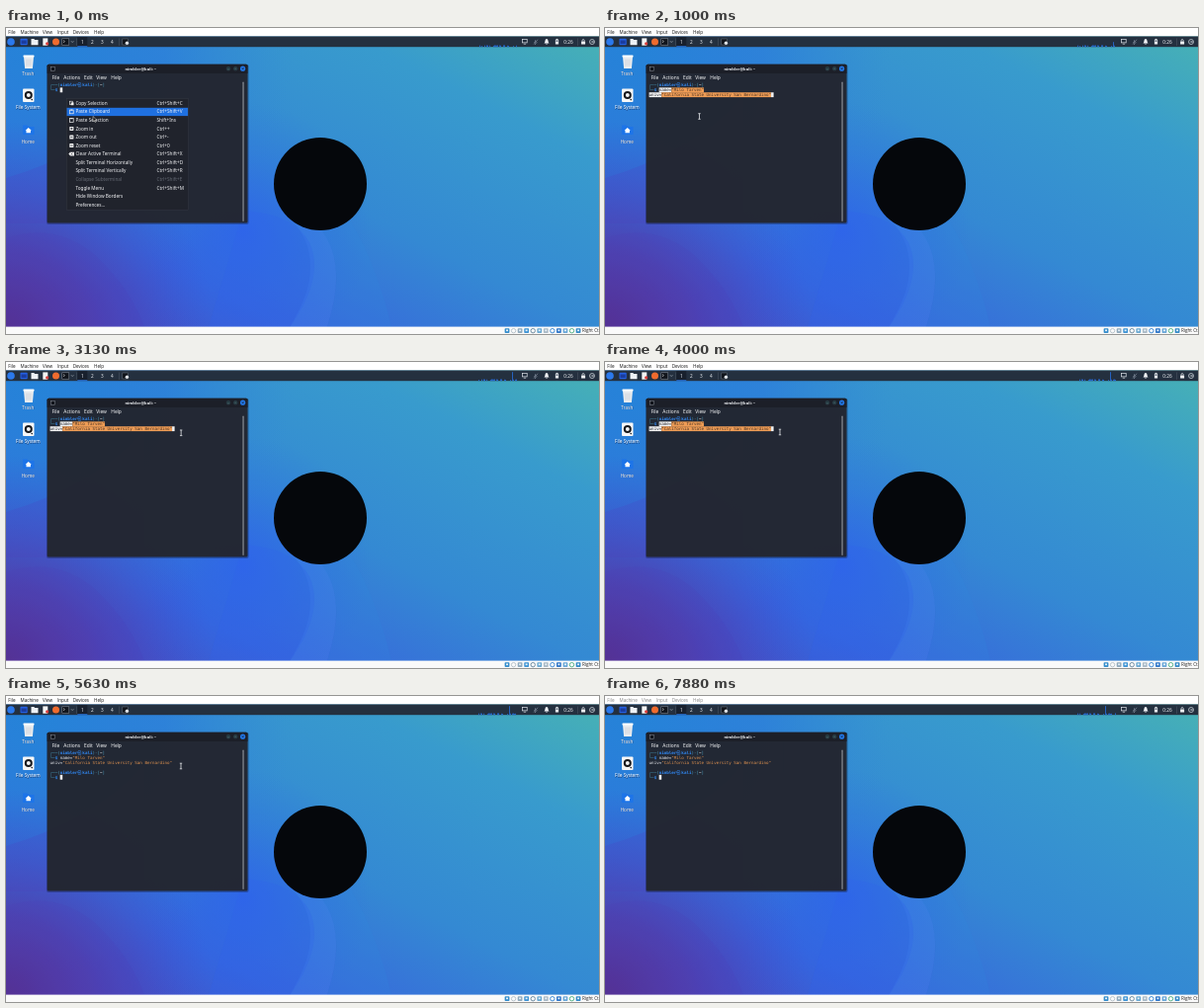
Recreate the animation shown at these times as an HTML page. Size 600x310 px, loop 8000 ms.

```html
<!DOCTYPE html>
<html lang="en">
<head>
<meta charset="utf-8">
<title>Terminal paste</title>
<style>
html, body { margin: 0; width: 100%; height: 100%; overflow: hidden; background: #3a8fd0; }
svg { display: block; width: 600px; height: 310px; }
text { font-family: "Noto Sans", "Open Sans", sans-serif; font-size: 4.7px; font-weight: 500; }
.mono { font-family: "DejaVu Sans Mono", "Noto Sans Mono", monospace; font-size: 4.2px; font-weight: 400; }
.host { font-family: "Open Sans", sans-serif; font-size: 4.6px; }
</style>
</head>
<body>
<svg id="stage" viewBox="0 0 600 310" xmlns="http://www.w3.org/2000/svg">
  <defs>
    <linearGradient id="sky" x1="0" y1="1" x2="1" y2="0">
      <stop offset="0" stop-color="#4a45b8"/>
      <stop offset=".25" stop-color="#3865dc"/>
      <stop offset=".5" stop-color="#3489d3"/>
      <stop offset=".78" stop-color="#389bcd"/>
      <stop offset="1" stop-color="#48b3b3"/>
    </linearGradient>
    <radialGradient id="purple" gradientUnits="userSpaceOnUse" cx="0" cy="305" r="210">
      <stop offset="0" stop-color="#55308f"/>
      <stop offset=".4" stop-color="#523aa8" stop-opacity=".75"/>
      <stop offset="1" stop-color="#4048cc" stop-opacity="0"/>
    </radialGradient>
    <radialGradient id="azure" gradientUnits="userSpaceOnUse" cx="240" cy="205" r="130">
      <stop offset="0" stop-color="#2c62ee" stop-opacity=".75"/>
      <stop offset="1" stop-color="#2c6ae0" stop-opacity="0"/>
    </radialGradient>
    <radialGradient id="corner" gradientUnits="userSpaceOnUse" cx="30" cy="20" r="260">
      <stop offset="0" stop-color="#2583d8"/>
      <stop offset=".5" stop-color="#2a7cdc" stop-opacity=".7"/>
      <stop offset="1" stop-color="#2f85d8" stop-opacity="0"/>
    </radialGradient>
  </defs>
  <rect width="600" height="310" fill="url(#sky)"/>
  <rect width="600" height="310" fill="url(#corner)"/>
  <rect width="600" height="310" fill="url(#azure)"/>
  <path d="M0 152Q90 125 140 70V198H0Z" fill="#4354cc" opacity=".35"/>
  <rect width="600" height="310" fill="url(#purple)"/>
  <path d="M0 213Q50 196 90 230Q125 262 140 303H0Z" fill="#4c38ae" opacity=".13"/>
  <path d="M300 190C330 206 345 240 325 303H287C308 270 322 226 285 190Z" fill="#4a8cf0" opacity=".22"/>
  <path d="M345 190Q374 235 390 303H325C343 246 335 212 300 190Z" fill="#2f86dc" opacity=".2"/>
  <path d="M240 185C290 188 312 210 312 240C312 265 297 290 287 303H205Z" fill="#2f5fea" opacity=".24"/>
  <circle cx="318" cy="158" r="47" fill="#05070b"/>
  <g id="desktop"></g>
  <g id="terminal"></g>
  <g id="blank"></g>
  <g id="pasted"></g>
  <g id="entered"></g>
  <g id="popup"></g>
  <g id="bars"></g>
  <g id="graph"></g>
  <path id="arrow" d="M0 0V5.2L1.3 4.1 2.2 6 3.1 5.6 2.3 3.8H3.9Z" fill="#111" stroke="#eee" stroke-width=".5"/>
  <path id="beam" d="M-1.2-2.8H1.2M0-2.8V2.8M-1.2 2.8H1.2" fill="none" stroke="#e4e6ea" stroke-width=".8"/>
</svg>
<script>
const $ = id => document.getElementById(id);
const text = (x, y, s, fill = "#fff", extra = "") =>
  `<text x="${x}" y="${y}" fill="${fill}" ${extra}>${s}</text>`;
const rect = (x, y, w, h, fill, extra = "") =>
  `<rect x="${x}" y="${y}" width="${w}" height="${h}" fill="${fill}" ${extra}/>`;
const circle = (x, y, r, fill, extra = "") =>
  `<circle cx="${x}" cy="${y}" r="${r}" fill="${fill}" ${extra}/>`;
const line = (d, stroke, w = .7) =>
  `<path d="${d}" fill="none" stroke="${stroke}" stroke-width="${w}"/>`;
const centered = 'text-anchor="middle"';

// Desktop icons
$("desktop").innerHTML =
  `<path d="M18 29H28L26.9 41H19.1Z" fill="#e9ecef"/>` + rect(17.5, 27.5, 11, 2, "#fff", 'rx=".6"') +
  line("M21 31.5V38.5M23 31.5V38.5M25 31.5V38.5", "#c3c8ce", .6) +
  rect(17, 61.5, 11.5, 13.5, "#f7f7f7", 'rx="1"') + circle(22.8, 68, 3, "none", 'stroke="#17191d" stroke-width="2"') + circle(26.2, 72.6, .8, "#17191d") +
  `<path d="M17 98.5H21.3L22.6 100H28.5V108H17Z" fill="#1d74e8"/><path d="M19.6 103.7 22.7 101 25.8 103.7H24.9V106.3H20.5V103.7Z" fill="#fff"/>` +
  [["Trash", 47.7], ["File System", 82.2], ["Home", 116.6]]
    .map(([s, y]) => text(22.6, y + .4, s, "#173a70", centered) + text(22.3, y, s, "#fff", centered)).join("");

// Terminal window
const user = "nimbler", person = "Milo Tarven";
$("terminal").innerHTML =
  rect(41, 37, 204.6, 162, "#0c1630", 'rx="2" opacity=".3"') +
  rect(41.7, 36.8, 202.8, 160.7, "#232630", 'rx="1.5" opacity=".955"') +
  `<path d="M41.7 46V38.3Q41.7 36.8 43.2 36.8H243Q244.5 36.8 244.5 38.3V46Z" fill="#1c1f28"/>` +
  rect(45.5, 39.3, 4.2, 4, "#11141b", 'stroke="#8d929b" stroke-width=".5"') +
  text(136.3, 42.9, user + "@kali: ~", "#eef0f3", centered + ' style="font-size:4.1px;font-weight:700"') +
  [225, 232.2].map(x => circle(x, 41.2, 1.9, "#22383f", 'stroke="#395058" stroke-width=".4"')).join("") +
  line("M224.2 41.8H225.8M231.4 41.2H233", "#6f8a8e", .5) +
  circle(239.6, 41.2, 2.6, "#2378e8") + line("M238.6 40.2 240.6 42.2M240.6 40.2 238.6 42.2", "#111b2a", .6) +
  [[46.4, "File"], [58.3, "Actions"], [79, "Edit"], [91.3, "View"], [106.3, "Help"]]
    .map(([x, s]) => text(x, 51.6, s, "#f6f7f8", 'style="font-size:4.85px"')).join("") +
  rect(239.3, 54.5, 1.5, 141.5, "#777b84", 'rx=".7"');

// Monospaced cells
const cell = 2.52, pitch = 4.87;
const colX = c => 44.6 + c * cell, rowY = r => 59.3 + r * pitch;
const put = (c, r, s, fill, bold) =>
  text(colX(c), rowY(r), s, fill, `class="mono"${bold ? ' style="font-weight:700"' : ""}`);
const fillCells = (c, r, n, color) => rect(colX(c), rowY(r) - 3.8, n * cell, pitch, color);
const teal = "#4a9fc0", blue = "#3189f4", pale = "#eceef2", amber = "#dd9150";
const prompt = r =>
  put(0, r, "┌──(", teal) + put(4, r, user, blue, true) +
  `<text x="${colX(11)}" y="${rowY(r)}" fill="${blue}" style="font-family:'Noto Sans CJK JP','Noto Sans CJK SC',sans-serif;font-size:4.2px">㉿</text>` +
  put(13, r, "kali", blue, true) + put(17, r, ")-[", teal) + put(20, r, "~", pale, true) + put(21, r, "]", teal) +
  put(0, r + 1, "└─", teal) + put(2, r + 1, "$", blue, true);
const cursor = (c, r) => fillCells(c, r, 1, "#f4f4f4");

const name = `"${person}"`, school = '"California State University San Bernardino"';
const command = (key, quoted) =>
  put(4, 1, "name=", key) + put(9, 1, name, quoted) +
  put(0, 2, "univ=", key) + put(5, 2, school, quoted);

$("blank").innerHTML = prompt(0) + cursor(4, 1);
$("pasted").innerHTML = prompt(0) +
  fillCells(4, 1, 5, "#f3f3f3") + fillCells(9, 1, name.length, "#ee9c55") +
  fillCells(0, 2, 5, "#f3f3f3") + fillCells(5, 2, school.length, "#ee9c55") +
  command("#252831", "#4b3425") + cursor(5 + school.length, 2);
$("entered").innerHTML = prompt(0) + command(pale, amber) + prompt(4) + cursor(4, 5);

// Context menu
const items = [
  ["Copy Selection", "Ctrl+Shift+C"], ["Paste Clipboard", "Ctrl+Shift+V"], ["Paste Selection", "Shift+Ins"],
  ["Zoom in", "Ctrl++"], ["Zoom out", "Ctrl+-"], ["Zoom reset", "Ctrl+0"],
  ["Clear Active Terminal", "Ctrl+Shift+X"], ["Split Terminal Horizontally", "Ctrl+Shift+D"],
  ["Split Terminal Vertically", "Ctrl+Shift+R"], ["Collapse Subterminal", "Ctrl+Shift+E"],
  ["Toggle Menu", "Ctrl+Shift+M"], ["Hide Window Borders", ""], ["Preferences...", ""]
];
const itemIcon = (i, y) => {
  if (i > 6) return "";
  if (i === 0) return rect(64.5, y - 2, 3, 3.2, "none", 'stroke="#eee" stroke-width=".6"') + rect(65.8, y - .8, 2.7, 2.8, "#eee");
  if (i < 3) return rect(64.6, y - 1.7, 3.6, 3.7, "none", 'stroke="#eee" stroke-width=".7"') + rect(65.5, y - 2.3, 1.8, 1.2, "#eee");
  if (i < 6) return rect(64.3, y - 2, 4.1, 4, "#eee", 'rx=".6"') +
    line(`M65.2 ${y}H67.5` + (i === 3 ? `M66.35 ${y - 1.1}V${y + 1.1}` : ""), "#22252f", .7);
  return `<path d="M63.3 ${y}L65 ${y - 1.8}H69V${y + 1.8}H65Z" fill="#eee"/>` +
    line(`M65.7 ${y - .8}l1.6 1.6m0-1.6l-1.6 1.6`, "#22252f", .5);
};
$("popup").innerHTML =
  rect(61.3, 71.7, 123, 112.5, "#20232c", 'stroke="#343842" stroke-width=".5"') +
  rect(61.5, 80.8, 122.6, 8.3, "#1f70e0") +
  items.map(([label, keys], i) => {
    const y = 76.2 + i * 8.57, color = i === 9 ? "#656a74" : "#f4f5f7";
    return itemIcon(i, y) + text(70.4, y + 1.7, label, color) + text(152.5, y + 1.7, keys, color);
  }).join("");

// Host menu, guest panel and status strip
const hostMenu = [[2.2, "File"], [14.5, "Machine"], [37, "View"], [52, "Input"], [67.7, "Devices"], [89, "Help"]]
  .map(([x, s]) => text(x, 6, s, "inherit", 'class="host"')).join("");
const statusColors = ["#348dcc", "#b9c5cd", "#8fa9bc", "#3d93d4", "#6f8da3", "#6aa9d2", "#a9b9c5", "#3d8bd6", "#2f76c9", "#69a7d8", "#58b58a", "#358ac7"];
$("bars").innerHTML =
  rect(0, 0, 600, 8.5, "#fff") + `<g id="hostMenu">${hostMenu}</g>` +
  rect(0, 8.5, 600, 10.7, "#24303f") +
  circle(5, 14, 3.8, "#2b79ec") +
  rect(14.5, 10.8, 7.2, 6.5, "#245fe0", 'rx=".7"') + rect(15.5, 12.5, 5.2, 3.5, "#1a3c9d") +
  `<path d="M25.5 11H28.2L29.2 12.1H32.5V17.2H25.5Z" fill="#eef2f6"/>` +
  rect(37.3, 10.4, 5, 7.3, "#f4f4f4") + circle(41.7, 15.8, 1.6, "#d83a38") +
  circle(50.5, 14, 3.5, "#ef6b2e") +
  rect(56.8, 10.8, 7, 6.4, "#11151c", 'stroke="#8d949e" stroke-width=".5"') + line("M58 12.4 59.4 13.6 58 14.8", "#eee", .6) +
  line("M66 13.3 67.2 14.5 68.4 13.3", "#c3c9d2", .6) +
  rect(72.3, 9, 10, 9.6, "#18202d") + rect(72.3, 18.3, 10, .9, "#2978ea") +
  [1, 2, 3, 4].map(n => text(67.4 + n * 10, 15.6, n, "#e8ebf0", centered)).join("") +
  rect(71.3, 10.5, .5, 7.5, "#4e5867") + rect(114, 10.5, .5, 7.5, "#4e5867") +
  rect(117.8, 11, 5.6, 6, "#10141b", 'stroke="#6d7580" stroke-width=".5"') + circle(122.4, 15.2, 1.7, "#dfe3e8") +
  rect(522.6, 11.6, 4.6, 3.3, "none", 'stroke="#dde2e8" stroke-width=".7"') + line("M523.7 16.2H526.1", "#dde2e8") +
  line("M535.5 12.2V14.6M534.3 14Q535.5 16.6 537.5 14.6M535.5 16V17M538 11.7 534 16.5", "#788392", .8) +
  `<path d="M544.5 15.4Q545.5 14.6 545.5 12.7Q545.6 11 547 10.9Q548.4 11 548.5 12.7Q548.5 14.6 549.5 15.4Z" fill="#f0f2f5"/>` + circle(547, 16.1, .7, "#f0f2f5") +
  rect(555.9, 11.6, 3.2, 5, "#e7eaee", 'rx=".4"') + rect(556.8, 10.9, 1.4, 1, "#e7eaee") + rect(556.6, 12.4, 1.8, 1.5, "#556071") +
  text(569, 15.6, "0:26", "#f0f2f5", centered) + rect(578, 10.5, .5, 7.5, "#4e5867") +
  rect(582.1, 13.4, 4, 3.2, "#f0f2f5", 'rx=".4"') + line("M583 13.5V12.2Q584.1 10.7 585.2 12.2V13.5", "#f0f2f5") +
  circle(593, 14, 2.5, "none", 'stroke="#dce1e7" stroke-width=".7"') + line("M591.8 14H594.4M593.5 13 594.5 14 593.5 15", "#dce1e7", .6) +
  rect(0, 302.6, 600, 7.4, "#fafafa") +
  statusColors.map((c, i) => i % 3 === 1
    ? circle(507 + i * 6.55, 306.7, 2.2, "none", `stroke="${c}" stroke-width="1"`)
    : rect(504.6 + i * 6.55, 304.3, 4.8, 4.8, c, 'rx=".8"') + rect(506 + i * 6.55, 305.5, 2, 1.7, "#e7f1f8")).join("") +
  text(583, 308.3, "Right Ctrl", "#222", 'class="host"');

// Processor graph: low noise with one spike, scrolling left in whole pixels
function drawGraph(t) {
  const shift = Math.floor(t / 850), spike = 515 - shift;
  let d = "";
  for (let x = 478; x < 517; x++) {
    const k = x + shift, noise = Math.abs(Math.sin(k * 12.99) * 437.58) % 1;
    const h = x === spike && t >= 850 ? (t < 1700 ? 5 : 9) : noise > .45 ? .5 + noise * 1.3 : 0;
    if (h) d += `M${x + .5} 19.2v${-h}`;
  }
  $("graph").innerHTML = line(d, "#2769d0", .9);
}

// Pointer stops: time, x, y
const route = [
  [0, 88, 89.5], [500, 88, 89.5], [1000, 95.5, 89.5], [1250, 95.5, 89.5], [1880, 178, 76],
  [2750, 178, 76], [3250, 177, 71], [6130, 177, 71], [6500, 260, 260.5], [7130, 260, 260.5], [7500, 262, 312]
];
function pointerAt(t) {
  const i = route.findIndex(p => p[0] > t);
  if (i < 0) return [262, 320];
  const [t0, x0, y0] = route[i - 1], [t1, x1, y1] = route[i];
  const u = (t - t0) / (t1 - t0), e = u * u * (3 - 2 * u);
  return [x0 + (x1 - x0) * e, y0 + (y1 - y0) * e];
}

const show = (id, on) => $(id).setAttribute("display", on ? "inline" : "none");
const closeAt = 750, pasteAt = 1000, enterAt = 4880, blurAt = 7500;

function render(time) {
  const t = Math.floor(time / 125) * 125;
  show("popup", t < closeAt);
  show("blank", t < pasteAt);
  show("pasted", t >= pasteAt && t < enterAt);
  show("entered", t >= enterAt);
  $("hostMenu").setAttribute("fill", t < blurAt ? "#151515" : "#858585");
  drawGraph(t);
  const [x, y] = pointerAt(t);
  const overText = t >= closeAt && x < 240 && y < 197;
  show("beam", overText);
  show("arrow", !overText && y < 310);
  for (const id of ["beam", "arrow"]) $(id).setAttribute("transform", `translate(${x} ${y})`);
}

const start = performance.now();
function tick() {
  render((performance.now() - start) % 8000);
  requestAnimationFrame(tick);
}
tick();
</script>
</body>
</html>
```
